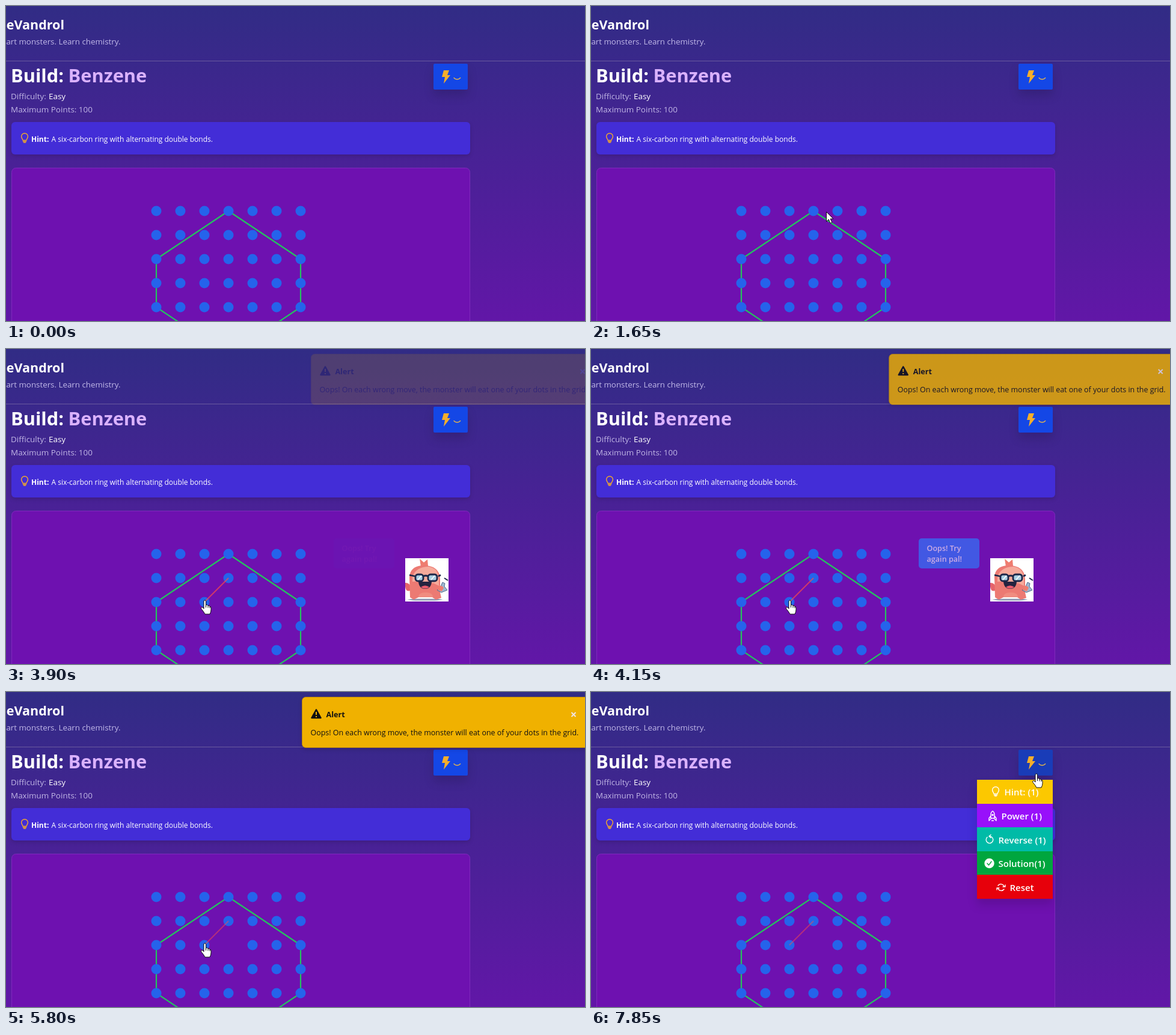
An HTML page that plays this animation: 963 px wide and 524 px high, repeating every 8000 ms.

```html
<!DOCTYPE html>
<html lang="en">
<head>
<meta charset="utf-8">
<title>Build: Benzene</title>
<style>
html, body { margin: 0; width: 100%; height: 100%; overflow: hidden; background: #312c85; }
svg { display: block; width: 100%; height: 100%; font-family: "Open Sans", "Noto Sans", sans-serif; }
text { white-space: pre; }
.b { font-weight: 700; }
.s { font-weight: 600; }
.soft { filter: drop-shadow(0 3px 3px #0002); }
.deep { filter: drop-shadow(0 10px 8px #0002); }
.line { fill: none; stroke-linecap: round; stroke-linejoin: round; }
</style>
</head>
<body>
<svg viewBox="0 0 963 524" preserveAspectRatio="none">
  <defs>
    <linearGradient id="sky" gradientUnits="userSpaceOnUse" x1="0" y1="0" x2="0" y2="660">
      <stop stop-color="#312c85"/><stop offset="1" stop-color="#6e11b0"/>
    </linearGradient>
    <g id="bulb" class="line" stroke-width="1.4">
      <path d="M-3 4C-3 2-5.400 .500-5.400-2.400a5.400 5.400 0 0 1 10.800 0C5.400 .500 3 2 3 4zM-2.600 6H2.600M-1.500 7.600H1.500"/>
    </g>
  </defs>

  <rect width="963" height="524" fill="url(#sky)"/>
  <text class="b" x="97" y="39" font-size="21.5" text-anchor="end" fill="#fff">eVandrol</text>
  <text x="190.5" y="64" font-size="13.35" text-anchor="end" fill="#c0b8e8">art monsters. Learn chemistry.</text>
  <path d="M0 91.5H963" stroke="#6a5a9f"/>

  <text class="b" x="8" y="127" font-size="30.8" fill="#fff">Build:</text>
  <text class="b" x="103.5" y="127" font-size="30.8" fill="#dab2ff">Benzene</text>
  <g font-size="13.45" fill="#c0b5e5">
    <text x="8" y="155">Difficulty: <tspan x="71" fill="#fff">Easy</tspan></text>
    <text x="8" y="177">Maximum Points: 100</text>
  </g>

  <rect class="soft" x="9" y="193" width="763" height="54" rx="6" fill="#432dd7"/>
  <use href="#bulb" x="31" y="219.5" stroke="#f5ab28"/>
  <text class="b" x="42" y="226" font-size="12" fill="#fff">Hint:</text>
  <text x="75.5" y="226" font-size="12" fill="#fff">A six-carbon ring with alternating double bonds.</text>

  <rect x="9.5" y="269.5" width="762" height="300" rx="7" fill="#6e11b0" stroke="#8029bd"/>
  <path class="line" d="M370 341L490 421V501L370 581L250 501V421Z" stroke="#22c55e" stroke-width="2.2"/>
  <g id="dots" fill="#2563eb"></g>
  <path id="wrong" d="M370 381L330 421" stroke="#fb4a4a" stroke-width="2"/>

  <g id="bubble">
    <rect x="545" y="315" width="101" height="50" rx="5" fill="#2b7fff"/>
    <g class="s" font-size="12.6" fill="#fff">
      <text x="558.5" y="336">Oops! Try</text>
      <text x="558.5" y="354">again pal!</text>
    </g>
  </g>

  <g id="monster" transform="translate(664 348)">
    <rect width="72" height="72" fill="#fff"/>
    <ellipse cx="33" cy="69" rx="29" ry="1.6" fill="#8f9bb3"/>
    <path d="M26 14L24 1l7 6 6-5 1 11z" fill="#ef7d70"/>
    <path d="M0 41q9-1 10 12q-9 5-10-6z" fill="#e5636a"/>
    <path d="M7 34C7 18 17 12 31 12s27 6 27 23v22l2 9-9 3-6-4H22l-8 4-6-4z" fill="#ec7a73"/>
    <path d="M12 30q7-16 27-16 17 3 17 22v10l-8-4q-18-5-36-3z" fill="#f6aa9b"/>
    <path d="M22 65q0-8 12-8t12 8z" fill="#f08c80"/>
    <path d="M22 39h22q-1 12-11 12T22 39z" fill="#26233f"/>
    <path d="M26 48q7-5 14 0-7 5-14 0z" fill="#ee5c6d"/>
    <g fill="#a9cfe3" stroke="#1c2748" stroke-width="2.8">
      <path d="M7 28l9 2M55 30l4-2" fill="none"/>
      <rect x="17" y="27" width="13" height="11" rx="4"/>
      <rect x="38" y="27" width="15" height="11" rx="4"/>
      <path d="M30 30q4-2 8 0" fill="none"/>
    </g>
    <path d="M21 36l6-7M43 36l6-7" stroke="#fff" stroke-width="1.5"/>
    <path d="M62 40l4 2-1 5 5 6-10 4-7-4 6-6z" fill="#9eb8d1" stroke="#526a8e"/>
    <path d="M55 47q6-3 9 2l-3 6-7-2z" fill="#ef7d70"/>
    <path d="M65 33l6 4" stroke="#1c2748" stroke-width="2"/>
  </g>

  <rect id="button" class="deep" x="711" y="96" width="57" height="43" rx="2"/>
  <path d="M728 107h9l-3 8h5l-11 14 2-11h-5z" fill="#f5ae2b"/>
  <path class="line" d="M745 119.5q2 2.5 5.3 2.5t5.4-2.5" stroke="#e8b64a" stroke-width="1.3"/>

  <g id="menu">
    <g class="deep" id="rows"></g>
    <g class="s" font-size="15" fill="#fff">
      <text x="687.5" y="172">Hint: (1)</text>
      <text x="682.5" y="212">Power (1)</text>
      <text x="677.5" y="252">Reverse (1)</text>
      <text x="677.5" y="291">Solution(1)</text>
      <text x="696.5" y="331">Reset</text>
    </g>
    <g class="line" stroke="#fff" stroke-width="1.4">
      <use href="#bulb" x="673" y="165.5"/>
      <path d="M665 210V204q0-4 3-6 3 2 3 6v6zM665 206l-3 4v4l3-3M671 206l3 4v4l-3-3M666.5 214h3"/>
      <circle cx="668" cy="204.5" r="1"/>
      <path d="M659 241.5a5.8 5.8 0 1 0 4-1.5M665 237.5l-3 2.5 3 2.5"/>
      <circle cx="662.5" cy="285" r="7.5" fill="#fff"/>
      <path d="M659 285l2.5 3 4.5-6" stroke="#00a63e"/>
      <path d="M677 322a5.800 5.800 0 0 1 10 1M687 328a5.800 5.800 0 0 1-10-1M685 324h4v-3M679 326h-4v3"/>
    </g>
  </g>

  <g id="alert">
    <rect class="soft" x="492.5" y="8.5" width="490" height="84" rx="6" fill="#f0b100" stroke="#b98610"/>
    <path d="M516 29.5L523.5 43H508.5Z" fill="#111" stroke="#111" stroke-width="2.5" stroke-linejoin="round"/>
    <path d="M516 33v5M516 40v2" stroke="#f0b100" stroke-width="2"/>
    <text class="b" x="532.5" y="42" font-size="12.6" fill="#111">Alert</text>
    <path d="M940.5 34l7 7M947.5 34l-7 7" stroke="#efe5ee" stroke-width="1.9"/>
    <text x="506.5" y="72" font-size="12.45" font-weight="500" fill="#111">Oops! On each wrong move, the monster will eat one of your dots in the grid.</text>
  </g>

  <g id="cursor" fill="#fff" stroke="#111" stroke-linejoin="round">
    <path id="arrow" d="M.5 .5V16.5L4.3 13 7 19.3 9.8 18 7.2 12H12Z"/>
    <path id="hand" transform="translate(0 -1)" d="M-1 12V0Q-1-2 .7-2T2.500 0V6Q5 4.500 6 7 8.500 6 9 8.500 11 8 11 10.500V14Q11 17 9 21H1Q-1 17-5 12.500-6.500 10-4 9.500-2.500 9.500-1 12ZM2.500 6V10M6 7V10.500M9 8.500V11"/>
  </g>
</svg>
<script>
const $ = id => document.getElementById(id);
const clamp = v => Math.max(0, Math.min(1, v));
const ramp = (t, from, to) => clamp((t - from) / (to - from));
const smooth = p => p * p * (3 - 2 * p);
const show = (id, on) => $(id).style.display = on ? "" : "none";

function add(parent, tag, attrs) {
  const el = document.createElementNS("http://www.w3.org/2000/svg", tag);
  for (const k in attrs) el.setAttribute(k, attrs[k]);
  return $(parent).appendChild(el);
}

for (let row = 0; row < 5; row++)
  for (let col = 0; col < 7; col++)
    add("dots", "circle", { id: `d${col}${row}`, cx: 250 + col * 40, cy: 341 + row * 40, r: 8.5 });

const rowTop = i => Math.round(146 + i * 39.6);
["#fcc800", "#9810fa", "#00bba7", "#00a63e", "#e7000b"].forEach((fill, i) =>
  add("rows", "rect", { x: 642, y: rowTop(i), width: 126, height: rowTop(i + 1) - rowTop(i), fill }));

// pointer path: time, x, y
const path = [
  [200, 608, 1], [600, 545, 175], [950, 502, 231], [1000, 502, 231], [1100, 487, 210],
  [1250, 487, 210], [1450, 417, 315], [1650, 391, 342], [1950, 371, 382], [2900, 371, 382],
  [3400, 330, 421], [6150, 330, 421], [6200, 337, 413], [6350, 440, 366], [6450, 492, 342],
  [6700, 652, 262], [6750, 676, 238], [7000, 716, 182], [7550, 740, 139]
];

function pointer(t) {
  const i = path.findIndex(p => p[0] > t);
  if (i < 0) return path[path.length - 1].slice(1);
  if (i === 0) return path[0].slice(1);
  const [a, b] = [path[i - 1], path[i]], p = ramp(t, a[0], b[0]);
  return [1, 2].map(k => a[k] + (b[k] - a[k]) * p);
}

function draw(now) {
  const t = Math.floor(now % 8000 / 50) * 50;

  const [x, y] = pointer(t);
  const hand = t >= 1900 && t < 3050 || t >= 3300 && t < 6200 || t >= 7500;
  show("cursor", t >= 200);
  show("hand", hand);
  show("arrow", !hand);
  $("cursor").setAttribute("transform", `translate(${x} ${y})`);

  $("d31").setAttribute("r", t >= 2650 && t < 3850 ? 10 : 8.5);
  show("d32", t < 4850);
  show("wrong", t >= 3850);
  $("wrong").setAttribute("opacity", t < 5800 ? .7 : .5);
  show("monster", t >= 3850 && t < 5800);
  $("bubble").setAttribute("opacity", smooth(clamp(1 - Math.abs(t - 4350) / 500)));

  const shown = ramp(t, 3845, 4220) * (1 - ramp(t, 6150, 6500));
  $("alert").setAttribute("opacity", shown);
  $("alert").setAttribute("transform", `translate(${17.5 * (1 - shown)} 0)`);

  const h = ramp(t, 7500, 7650);
  $("button").setAttribute("fill", `rgb(${20 + 5 * h},${71 - 11 * h},${230 - 46 * h})`);
  show("menu", t >= 7850);
}

const start = performance.now();
(function loop() {
  draw(performance.now() - start);
  requestAnimationFrame(loop);
})();
</script>
</body>
</html>
```
